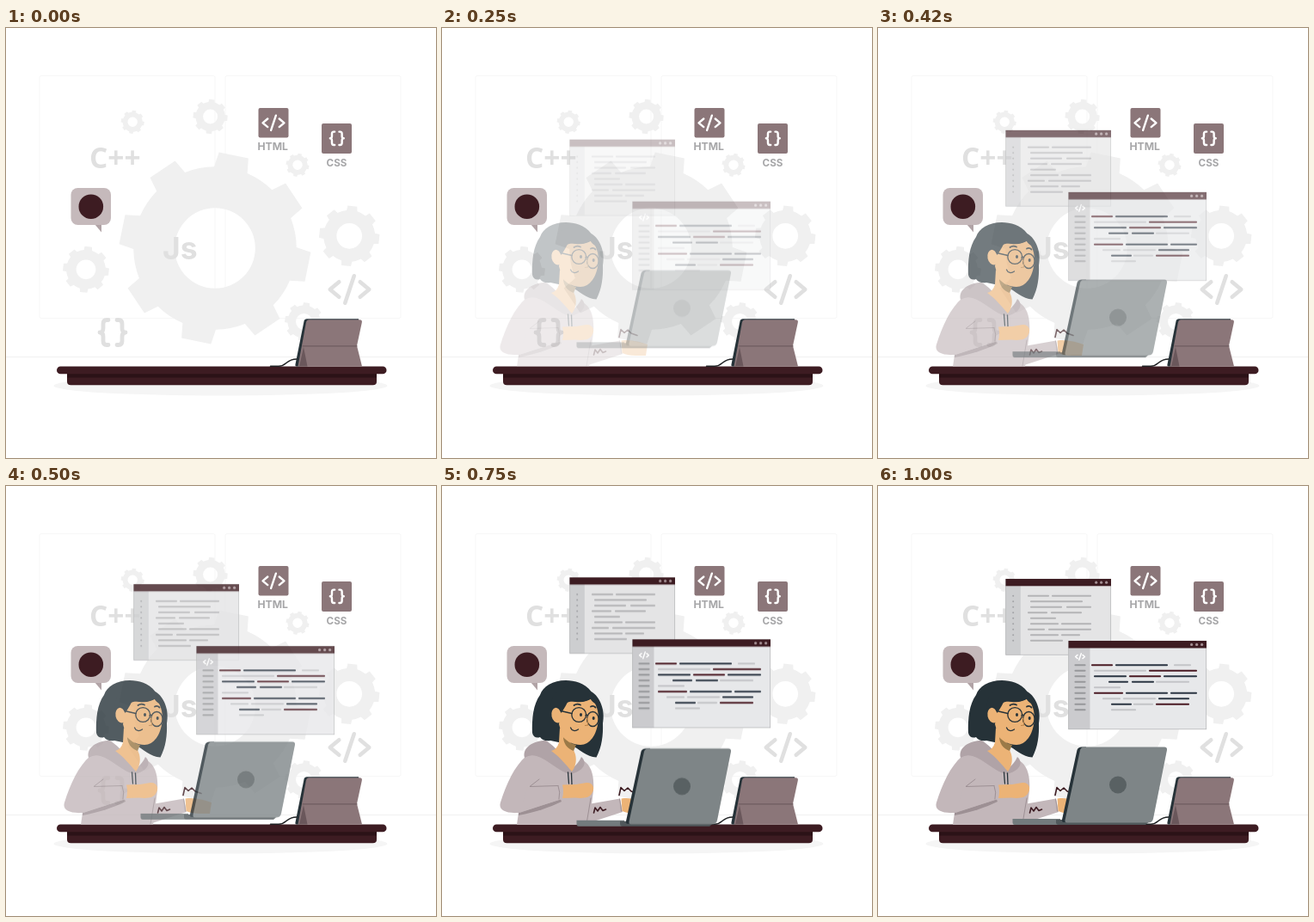
An HTML page for the animation above (1040 ms loop, 500 by 500 pixels).

```html
<!DOCTYPE html>
<html lang="en">
<head>
<meta charset="utf-8">
<title>Coding desk</title>
<style>
  html, body { margin: 0; width: 100%; height: 100%; overflow: hidden; background: #fff; }
  svg { display: block; width: 100%; height: 100%; }
  text { font-weight: 700; font-family: Inter, sans-serif; }

  .fade, .slide { animation: 1040ms linear infinite; }
  .fade { animation-name: fade; }
  .slide { animation-name: slide; }
  .up { --dy: 27.4px; }
  .down { --dy: -27.4px; }

  /* Hidden at first, then eased in with a slight overshoot */
  @keyframes fade {
    0%, 12.49% { opacity: 0; }
    12.5% { opacity: .088; animation-timing-function: cubic-bezier(.304, .326, .501, 1.351); }
    93.6%, 100% { opacity: 1; }
  }
  @keyframes slide {
    0%, 12.49% { opacity: 0; transform: translateY(var(--dy)); }
    12.5% {
      opacity: .088; transform: translateY(var(--dy));
      animation-timing-function: cubic-bezier(.304, .326, .501, 1.351);
    }
    93.6%, 100% { opacity: 1; transform: none; }
  }

  .line { fill: none; stroke-linecap: round; stroke-linejoin: round; }
  .maroon { fill: #3d1c22; }
  .mauve { fill: #8b7679; }
  .dark { fill: #263238; }
  .skin { fill: #ecb376; }
  .cloth { fill: #c3b7ba; }
  .fold { stroke: #9d9094; stroke-width: 1; }
  .ink { stroke: #263238; stroke-width: 1.3; }
</style>
</head>
<body>
<svg viewBox="0 0 500 500">
  <defs>
    <g id="tag" class="line">
      <path d="M-7 -5L-13 0L-7 5M3 -9L-3 9M7 -5L13 0L7 5"/>
    </g>
    <g id="braces" class="line">
      <path d="M-5 -14.5H-7Q-11 -14.5 -11 -10V-5Q-11 0 -15 0Q-11 0 -11 5V10Q-11 14.5 -7 14.5H-5"/>
      <path d="M5 -14.5H7Q11 -14.5 11 -10V-5Q11 0 15 0Q11 0 11 5V10Q11 14.5 7 14.5H5"/>
    </g>
  </defs>

  <!-- Room -->
  <g fill="none" stroke="#f7f7f7">
    <rect x="39" y="55.5" width="204" height="282" rx="2"/>
    <rect x="255" y="55.5" width="204" height="282" rx="2"/>
    <path d="M0 382.5H500" stroke="#f1f1f1"/>
  </g>
  <ellipse cx="249.5" cy="416" rx="194" ry="11.5" fill="#f5f5f5"/>
  <g id="gears" fill="#f0f0f0" fill-rule="evenodd"></g>

  <g fill="#e0e0e0">
    <text x="97" y="162.5" font-size="33.5" style="font-family: 'Open Sans', sans-serif">C++</text>
    <text x="182" y="269" font-size="35.5">Js</text>
  </g>
  <g stroke="#e0e0e0">
    <use href="#tag" transform="translate(399.5 304) scale(1.75)" stroke-width="2.6"/>
    <use href="#braces" transform="translate(124 354)" stroke-width="4.8"/>
  </g>

  <g class="mauve">
    <rect x="293.5" y="93" width="35" height="34.5" rx="2"/>
    <rect x="367" y="111" width="35" height="35" rx="2"/>
  </g>
  <g stroke="#fff">
    <use href="#tag" transform="translate(311 110.3) scale(.96)" stroke-width="2.5"/>
    <use href="#braces" transform="translate(384.8 128.3) scale(.53)" stroke-width="4.6"/>
  </g>
  <g fill="#a6a6a8">
    <text x="292.5" y="142.3" font-size="12.2">HTML</text>
    <text x="372.6" y="160.5" font-size="11.6">CSS</text>
  </g>

  <path d="M103 228L111 237.5V226Z" fill="#b1a3a6"/>
  <rect x="75.5" y="186" width="46.5" height="43" rx="8" fill="#c5b9bb"/>
  <circle class="maroon" cx="98.8" cy="207.7" r="14.3"/>

  <!-- Desk -->
  <path class="maroon" d="M71 400H431V411Q431 415.300 426.500 415.300H75.500Q71 415.300 71 411Z"/>
  <path d="M71 402H431V406.500H71Z" fill="#2b1217"/>
  <rect class="maroon" x="59" y="393.500" width="383.500" height="8.800" rx="4.400"/>

  <!-- Tablet -->
  <path class="dark" d="M350 338.200H410V341L341 393.500H338Q336 393.500 336.500 391L346.500 341Q347 338.200 350 338.200Z"/>
  <path class="mauve" d="M352 339.200H411Q414.500 339.200 413.800 342.500L408 369.500L414 393.500H339.500L349 342Q349.600 339.200 352 339.200Z"/>
  <path d="M346 371L341 393.500H350.500Z" fill="#6a575b"/>
  <path class="line" d="M345 369.800H408" stroke="#6f5c60" stroke-width="1.300"/>
  <path class="line" d="M307.500 393.300H317C327 393.300 325 385 338 385" stroke="#1f2123" stroke-width="1.500"/>

  <!-- Code windows -->
  <g class="slide up">
    <rect x="148.500" y="108" width="122.500" height="88.500" fill="#e4e4e5"/>
    <rect x="148.500" y="108" width="17.300" height="88.500" fill="#cdced0"/>
    <rect x="148.700" y="108.200" width="122" height="88" fill="none" stroke="#b3b4b6" stroke-width=".7"/>
    <rect class="maroon" x="148.500" y="108" width="122.500" height="8.300"/>
    <g id="code1"></g>
  </g>
  <g class="slide up">
    <rect x="221.500" y="180" width="160.500" height="103" fill="#e7e8ea"/>
    <rect x="221.500" y="180" width="25" height="103" fill="#cbcbce"/>
    <rect x="221.700" y="180.200" width="160" height="102.600" fill="none" stroke="#b3b4b6" stroke-width=".7"/>
    <rect class="maroon" x="221.500" y="180" width="160.500" height="8.500"/>
    <use href="#tag" transform="translate(235 198.500) scale(.42)" stroke="#fff" stroke-width="3.400"/>
    <g id="code2"></g>
  </g>

  <!-- Woman -->
  <g class="fade">
    <path class="dark" d="M144 226C129 226 117 233 114 243C106 254 104.500 270 105 287C106 292 110 293.500 114 292C117 296 121 297 126 296L150 301C160 306 168 315 179.500 315.500C186 303 187.500 290 187 276C190 261 184 245 173.500 239C166 229 154 226 144 226Z"/>
    <path class="cloth" d="M98 314C84 326 75 346 68 368C65.500 376 72 381 89 380L87 394H171L175 362C178 343 176 326 164 319L150 333L120 305Z"/>
    <path class="cloth" d="M170 370L207 363.500L210 379L170 392Z"/>
    <path class="line fold" d="M173 363L168 393" stroke-width="2.500"/>
    <path d="M96 316C93 304 106 296 121 296C132 303 142 316 151 328C156 325 160 320 162 315C168 320 168 330 150 335C136 333 124 318 110 314Q102 312 96 316Z" fill="#b0a3a7"/>
    <path class="skin" d="M137 281L136 298Q134 306 127 308C137 315 144 324 151 332C155 327 157 320 155 312L150 299Z"/>
    <path d="M141 291C145 297 151 300 156 301L153 308C145 305 141 299 141 291Z" fill="#9b7a48"/>
    <path class="skin" d="M138 262C141 254 147 249 155 251C163 252 170 250 174 247C179 253 183 262 181.500 274C180 289 172 301 161 301C153 301 145 297 140 291L136 277Z"/>
    <ellipse class="skin" cx="133.800" cy="266.500" rx="6.500" ry="9" transform="rotate(-12 134 266)"/>
    <path class="dark" d="M126 259C126 242 139 232 154 232C167 232 176 239 180 254C176 252 174 250 172.500 247.500C165 252 154 252 147 249C145 254 142 259 138.500 264C136 257 131 256 126 259Z"/>
    <g class="line ink">
      <circle cx="159.200" cy="266" r="8.400"/>
      <ellipse cx="175.300" cy="271" rx="6.800" ry="8.500"/>
      <path d="M138 261.500L151 264.500M167 266.500Q168.500 265.500 169.500 267"/>
      <path d="M153.500 255Q157 252.500 161 254.500M173 256.500Q176 255 178.500 257.500" stroke-width="1.800"/>
      <path d="M149.500 281C151 285 155 285.500 158.500 283"/>
      <path d="M168.500 270L170 278L166.500 278.500" stroke="#b98144" stroke-width="1"/>
    </g>
    <ellipse class="dark" cx="161.500" cy="266" rx="1.500" ry="2"/>
    <ellipse class="dark" cx="176.200" cy="270" rx="1.500" ry="2"/>
    <path class="line ink" d="M146.500 333L147.500 346M150.500 334L151 347"/>
    <path d="M89 380L138 364.500L139 367C124 374 110 379 89 383Z" fill="#9d9094"/>
    <path class="cloth" d="M100 349L136 347.500Q140 355 138.500 364L90 380Z"/>
    <path class="line fold" d="M113 341L102 349.500L135 348.500M135 348.500Q138 356 136 364"/>
    <path class="skin" d="M140 347.500L156 347L168 345C176 344.500 178 352 174.500 357C172 363 163 363.500 155 362.500L140 363Q142 355 140 347.500Z"/>
    <path class="skin" d="M208.500 363.500C219 362 229 365 239 368L237 381H225C219 381 214 380 209.500 378Z"/>
    <path class="line fold" d="M206.500 364Q208 371 208.500 378"/>
    <g class="line" stroke="#3d1c22" stroke-width="1.600">
      <path d="M206 359.500L208 350.500L212 354.500L216 351L220 355L227 357.500"/>
      <path d="M176.500 380L178 374L181 378L184 373.500L187 377.500L190.500 376"/>
    </g>
  </g>

  <!-- Laptop -->
  <g class="slide down">
    <path d="M156.500 387H212V394H159Q156.500 394 156.500 391Z" fill="#737b7d"/>
    <path d="M207 388H318L311 394H210Q207 394 207 391Z" fill="#50585b"/>
    <path class="dark" d="M237 303.500H242L222 391H216Q213.500 391 214 388L231.500 307Q232.500 303.500 237 303.500Z"/>
    <path d="M240 303.500H333Q336.500 303.500 336 307L320 387Q319 391.500 314 391.500H220Q217 391.500 217.500 388.500L235 307Q236 303.500 240 303.500Z" fill="#7e8587"/>
    <circle cx="279" cy="347.500" r="10" fill="#596163"/>
  </g>
</svg>
<script>
  const byId = id => document.getElementById(id);

  // Eight-toothed gear; all sizes share the same proportions
  function gear(x, y, radius, turn) {
    const body = radius * .85, hole = radius * .42;
    const at = (r, deg) => {
      const a = deg * Math.PI / 180;
      return (x + r * Math.sin(a)).toFixed(2) + ' ' + (y - r * Math.cos(a)).toFixed(2);
    };
    let d = '';
    for (let k = 0; k < 8; k++) {
      const a = turn + k * 45;
      d += `${k ? `A${body} ${body} 0 0 1 ` : 'M'}${at(body, a - 12)}`
        + `L${at(radius, a - 9)}L${at(radius, a + 9)}L${at(body, a + 12)}`;
    }
    d += `A${body} ${body} 0 0 1 ${at(body, turn - 12)}Z`;
    d += `M${x - hole} ${y}a${hole} ${hole} 0 1 0 ${2 * hole} 0a${hole} ${hole} 0 1 0 ${-2 * hole} 0Z`;
    return `<path d="${d}"/>`;
  }

  byId('gears').innerHTML = [
    [243, 256, 111.5, 11.4], [147.2, 109.3, 13.6, 8], [237.6, 103, 20.2, 5],
    [339, 159.3, 13.6, 12], [93, 280.8, 27, 6], [399.2, 241.8, 35.3, 6], [346.5, 341.5, 22.5, 8]
  ].map(g => gear(...g)).join('');

  const ink = { m: '#4a1a23', n: '#2b3542', l: '#c3c4c7', g: '#b4b4b6', s: '#97989b' };
  const stroke = (x1, x2, y, color) =>
    `<path class="line" d="M${x1 + .9} ${y}H${x2 - .9}" stroke="${color}" stroke-width="1.9"/>`;
  const dots = (xs, y) =>
    xs.map(x => `<circle cx="${x}" cy="${y}" r="1.6" fill="#a38e92"/>`).join('');

  // Rows are split by "|"; each piece is colour, start, end
  const code = (rows, top) => rows.split('|').map((row, i) =>
    row.split(' ').map(piece => {
      const [from, to] = piece.slice(1).split('-').map(Number);
      return stroke(from, to, top + i * 6.5, ink[piece[0]]);
    }).join('')).join('');

  const nine = [...Array(9).keys()];

  byId('code1').innerHTML = dots([253.7, 259.6, 265.6], 112.2)
    + nine.map(i => `<circle cx="157.2" cy="${127.8 + i * 6.5}" r="1" fill="#a2a3a6"/>`).join('')
    + code('g174-199 g202-248|g177-238|g177-214 g219-248|g174-197 g201-237|g177-207|'
      + 'g177-210 g213-248|g174-194 g198-248|g177-210 g213-235|g177-215', 127.8);

  byId('code2').innerHTML = dots([364.6, 370.6, 376.6], 184.4)
    + nine.map(i => stroke(228.5, 241.5, 208.3 + i * 6.5, ink.s)).join('')
    + code('m248-273 n276-337 l344-364|l251-312 m315-371|n251-289 m292-329 n332-371|'
      + 'n268-291 n295-321 l323-362|l251-282|m251-285 n288-337 n340-371|'
      + 'l261-282 l285-323 n326-362|n271-295 l297-320 m323-362|l271-300', 208.3);
</script>
</body>
</html>
```
